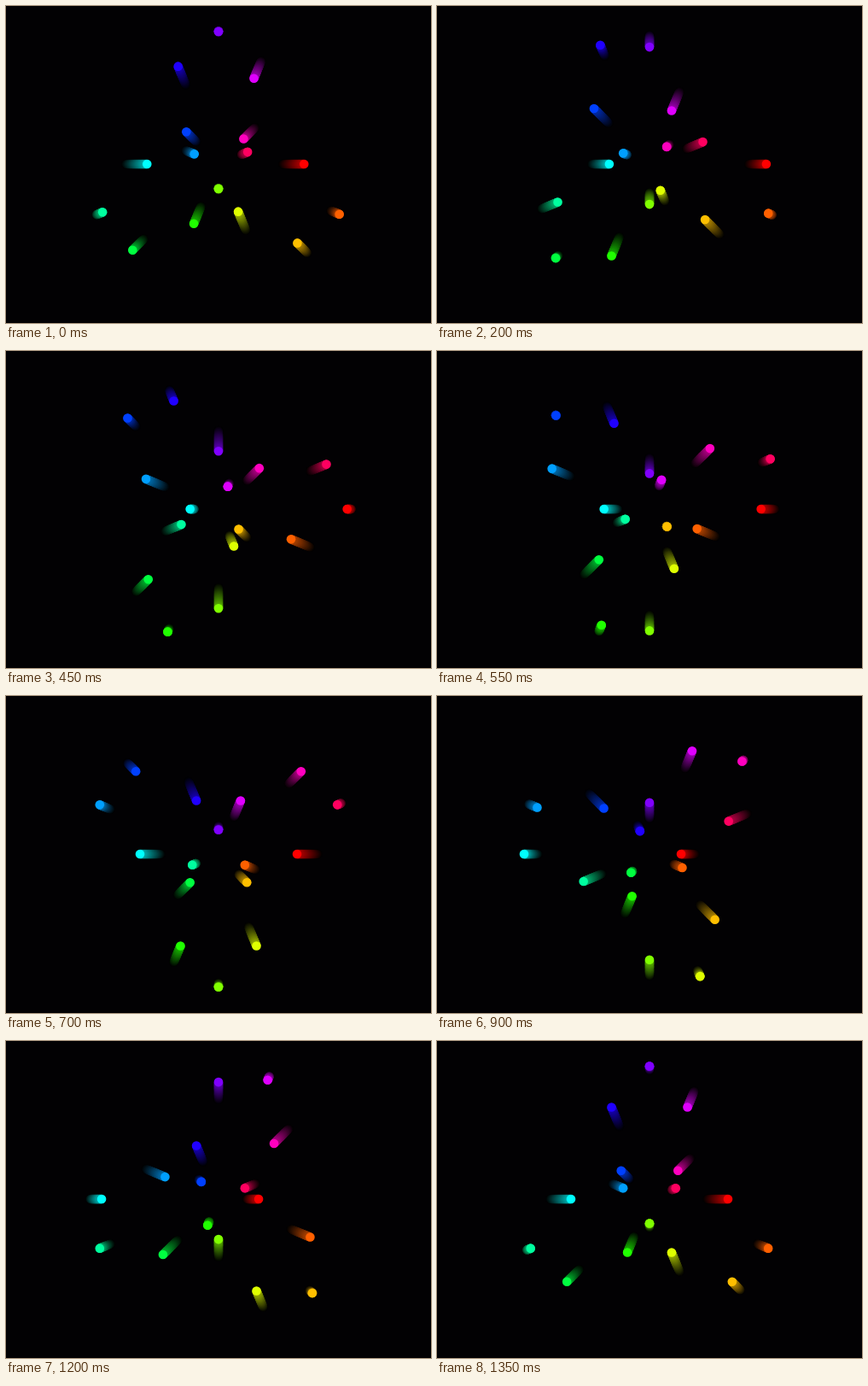
An HTML page with a canvas for the animation above (1400 ms loop, 498 px wide and 371 px high).

```html
<!DOCTYPE html>
<html lang="en">
<head>
<meta charset="utf-8">
<title>Pulsing dots</title>
<style>
  html, body { margin: 0; height: 100%; overflow: hidden; background: #020103; }
  canvas { display: block; }
</style>
</head>
<body>
<canvas id="stage" width="498" height="371"></canvas>
<script>
const ctx = document.getElementById('stage').getContext('2d');
const LOOP = 1400, TICK = 50, DOTS = 16, STEPS = 48, TRAIL = 24;
const TAU = Math.PI * 2;

// [time in ms, step of the 48-step cycle]: the pace is slightly uneven
const pace = [[0, 1], [350, 11], [550, 19], [700, 24], [900, 32], [1100, 39], [1350, 48], [1400, 49]];

function stepAt(time) {
  const t = Math.floor(time / TICK) * TICK;
  const i = pace.findIndex(([end]) => end > t);
  const [t0, s0] = pace[i - 1], [t1, s1] = pace[i];
  return Math.floor(s0 + (s1 - s0) * (t - t0) / (t1 - t0) + 1e-6);
}

function drawDot(k, step, light) {
  const angle = k / DOTS * TAU;
  // three waves run around the ring
  const r = 92 + 63.5 * Math.cos(3 * angle - Math.PI / 2 + step / STEPS * TAU);
  ctx.fillStyle = `hsl(${k * 360 / DOTS}, 100%, ${light}%)`;
  ctx.beginPath();
  ctx.arc(249 + r * Math.cos(angle), 185 + r * Math.sin(angle), 5.3, 0, TAU);
  ctx.fill();
}

function draw(time) {
  const step = stepAt(time % LOOP);
  ctx.fillStyle = '#020103';
  ctx.fillRect(0, 0, 498, 371);
  for (let k = 0; k < DOTS; k++) {
    for (let j = TRAIL; j > 0; j--) {
      const age = j / TRAIL;
      drawDot(k, step - 3 * age, 33 * (1 - age) + 0.8);
    }
    drawDot(k, step, 50);
  }
}

let start;
function frame(now) {
  start ??= now;
  draw(now - start);
  requestAnimationFrame(frame);
}
draw(0);
requestAnimationFrame(frame);
</script>
</body>
</html>
```
